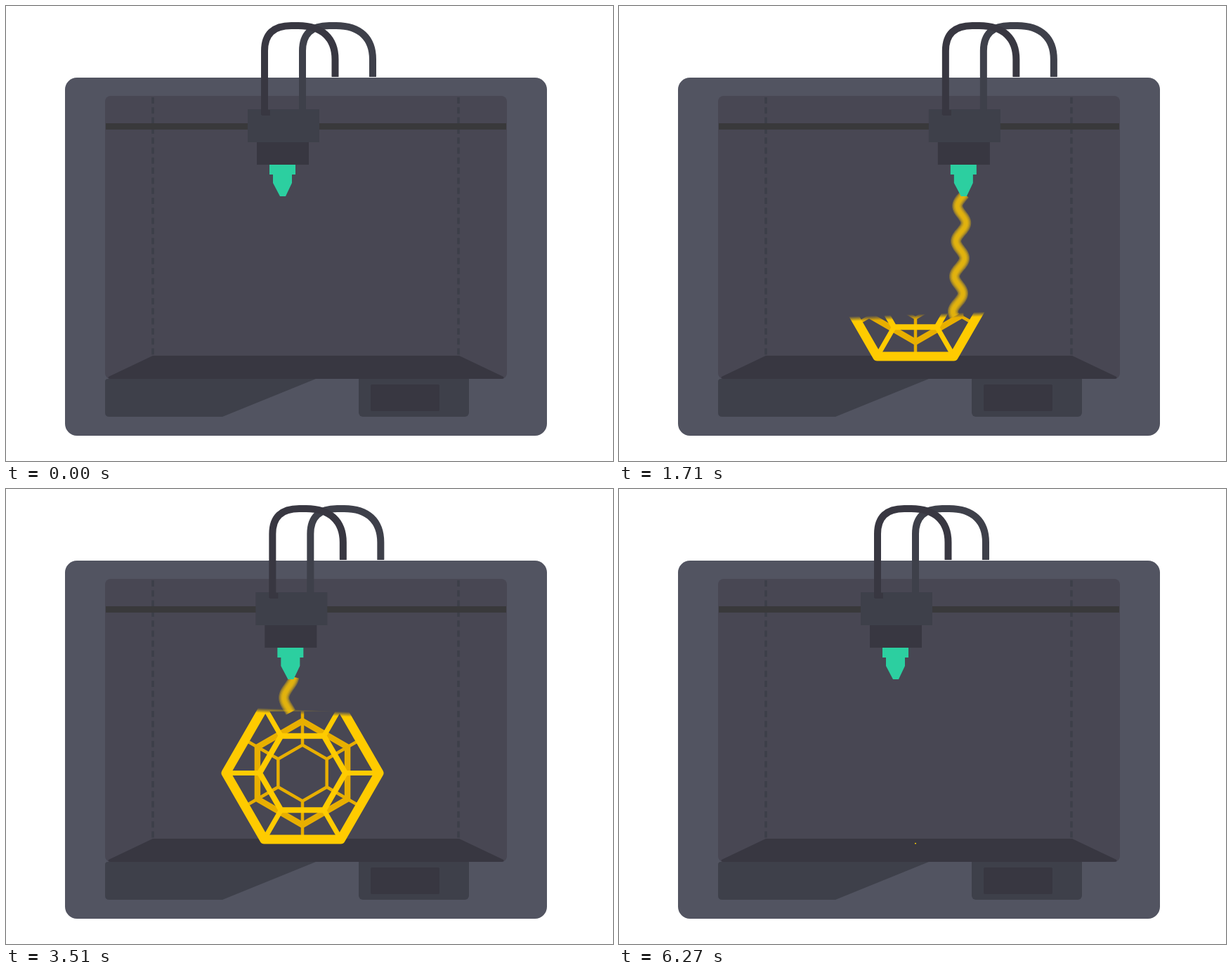
Recreate the animation shown at these times as an HTML page with a canvas. Size 864 by 648 pixels, loop 6.3 s.

```html
<!DOCTYPE html>
<html lang="en">
<head>
<meta charset="utf-8">
<title>3D printer</title>
<style>
html, body { margin: 0; height: 100%; overflow: hidden; background: #fff; }
canvas { display: block; }
</style>
</head>
<body>
<canvas id="stage" width="864" height="648"></canvas>
<script>
const W = 864, H = 648, LOOP = 6300, STEP = 30;
const DARK = '#383741', SLATE = '#3e404a', GOLD = '#ffcb00', SHADE = '#e8af00';
const CX = 422, CY = 404.5, FLOOR = 505.5, TIP = 270;
const TAU = Math.PI * 2;

const ctx = document.getElementById('stage').getContext('2d');
const layer = document.createElement('canvas');
layer.width = W;
layer.height = H;
const model = layer.getContext('2d');

const clamp = v => Math.max(0, Math.min(1, v));
const ease = v => (1 - Math.cos(Math.PI * clamp(v))) / 2;

function track(keys, t) {
  if (t <= keys[0][0]) return keys[0][1];
  for (let i = 1; i < keys.length; i++) {
    const [t0, a] = keys[i - 1], [t1, b] = keys[i];
    if (t <= t1) return a + (b - a) * (t - t0) / (t1 - t0);
  }
  return keys[keys.length - 1][1];
}

function fill(c, color, path) {
  c.fillStyle = color;
  c.fill(new Path2D(path));
}

function stroke(c, color, width, path) {
  c.strokeStyle = color;
  c.lineWidth = width;
  c.stroke(new Path2D(path));
}

function box(color, x, y, w, h, r = 0) {
  ctx.fillStyle = color;
  ctx.beginPath();
  ctx.roundRect(x, y, w, h, r);
  ctx.fill();
}

function polar(r, deg) {
  const a = deg * Math.PI / 180;
  return `${CX + r * Math.cos(a)} ${CY + r * Math.sin(a)}`;
}

const SIXTHS = [0, 60, 120, 180, 240, 300];
const hexagon = (r, turn) => 'M' + SIXTHS.map(a => polar(r, a + turn)).join('L') + 'Z';
const spokes = (r0, r1, turn) =>
  SIXTHS.map(a => `M${polar(r0, a + turn)}L${polar(r1, a + turn)}`).join('');

// Sweeps of the print head, counted in full left-right cycles
const SWEEPS = [[60, 0], [930, 2.08], [1710, 4.35], [2400, 6.07], [3510, 9.09], [4200, 11]];
const REACH = [[60, 103], [690, 106], [1350, 113], [1710, 122], [2400, 147], [3990, 145], [4200, 138]];

function drawCase() {
  box('#525461', 84, 102, 686, 510, 17);
  box('#484753', 141, 128, 572, 403, 8);
  ctx.setLineDash([9, 5.3]);
  stroke(ctx, '#3d3f49', 3.5, 'M209 130V498M644 130V498');
  ctx.setLineDash([]);
  box('#39393b', 142, 167, 570, 9);
  fill(ctx, DARK, 'M209 498H645L708 528Q710 531 705 531H149Q144 531 146 528Z');
  fill(ctx, SLATE, 'M145 531H441L308 585H147Q141 585 141 579V535Q141 531 145 531Z');
  box(SLATE, 502, 531, 157, 54, [0, 0, 6, 6]);
  box(DARK, 519, 539, 98, 38, 2);
}

function drawHead(dx) {
  ctx.save();
  ctx.translate(dx, 0);
  box(SLATE, 344, 147, 102, 47);
  box(DARK, 357, 194, 74, 32);
  fill(ctx, '#2ccfa0', 'M375 226H412V240H407V252L398 271H390L380 252V240H375Z');
  stroke(ctx, SLATE, 10, 'M422 149V64Q422 28 460 28H470C504 28 522 46 522 76V101');
  stroke(ctx, DARK, 10, 'M368 155V64Q368 28 406 28H416C450 28 468.500 46 468.500 76V101');
  box(DARK, 364, 148, 12, 8);
  ctx.restore();
}

function drawFilament(t, noseX, swing, edge) {
  const end = Math.min(edge + 2, TIP + (t - 60) * 0.9);
  const bend = Math.max(5, Math.min(15, 15 - (t - 930) * 0.0065));
  const wave = 56 + bend * swing;
  const shift = 0.35 + 0.11 * swing;
  ctx.beginPath();
  for (let y = TIP - 2; y <= end; y += 2) {
    const d = y - TIP;
    ctx.lineTo(noseX - 2 - d * 0.042 - 6.5 * Math.cos(TAU * (d / wave - shift)), y);
  }
  ctx.save();
  ctx.globalAlpha = 0.3 * clamp((4200 - t) / 120);
  ctx.strokeStyle = '#ffc800';
  ctx.lineJoin = 'round';
  for (const width of [15, 12.5, 10, 7.5, 5]) {
    ctx.lineWidth = width;
    ctx.stroke();
  }
  ctx.restore();
}

function drawModel(t, edge, slope) {
  const c = model;
  c.clearRect(0, 0, W, H);
  c.lineJoin = 'miter';
  stroke(c, SHADE, 4.5, hexagon(40, 30) + spokes(40, 92, 30));
  stroke(c, SHADE, 8.5, hexagon(74, 30));
  stroke(c, GOLD, 7, spokes(61, 108, 0));
  stroke(c, GOLD, 8, hexagon(61, 0));
  c.lineJoin = 'round';
  stroke(c, GOLD, 13, hexagon(109, 0));

  c.save();
  if (t < 4200) {
    // Hide what is not printed yet, with a soft edge
    c.globalCompositeOperation = 'destination-out';
    c.translate(CX, edge);
    c.transform(1, slope, 0, 1, 0, 0);
    const soft = c.createLinearGradient(0, -3, 0, 4);
    soft.addColorStop(0, '#000');
    soft.addColorStop(1, '#0000');
    c.fillStyle = soft;
    c.fillRect(-CX, -H, W, H + 4);
  } else if (t >= 4650 && t < 4980) {
    // Glint running from the top left to the bottom right
    c.globalCompositeOperation = 'source-atop';
    c.rotate(Math.atan2(0.8, 0.6));
    c.fillStyle = '#ffe600';
    c.fillRect(480 + (t - 4650) * 0.75 - 48, -H, 48, 2 * H);
  }
  c.restore();

  const swell = 1 + 0.03 * ease((t - 5310) / 650);
  const scale = swell * (1 - ease((t - 5960) / 330));
  ctx.save();
  ctx.translate(CX, FLOOR);
  ctx.scale(scale, scale);
  ctx.translate(-CX, -FLOOR);
  ctx.drawImage(layer, 0, 0);
  ctx.restore();
}

function draw(t) {
  const swing = Math.cos(TAU * track(SWEEPS, t));
  const dx = track(REACH, t) * (1 - swing) / 2;
  const p = clamp((t - 60) / 4140);
  const edge = FLOOR - 202 * ease(p) + 7 * Math.sin(Math.PI * p) ** 4;
  const slope = 0.06 * swing * clamp((t - 600) / 1000) * clamp((4200 - t) / 800);

  ctx.fillStyle = '#fff';
  ctx.fillRect(0, 0, W, H);
  drawCase();
  if (t >= 60 && t < 4200) drawFilament(t, 394 + dx, swing, edge);
  if (t >= 60) drawModel(t, edge, slope);
  drawHead(dx);
}

const start = performance.now();
function tick() {
  const t = (performance.now() - start) % LOOP;
  draw(Math.floor(t / STEP) * STEP);
  requestAnimationFrame(tick);
}
tick();
</script>
</body>
</html>
```
